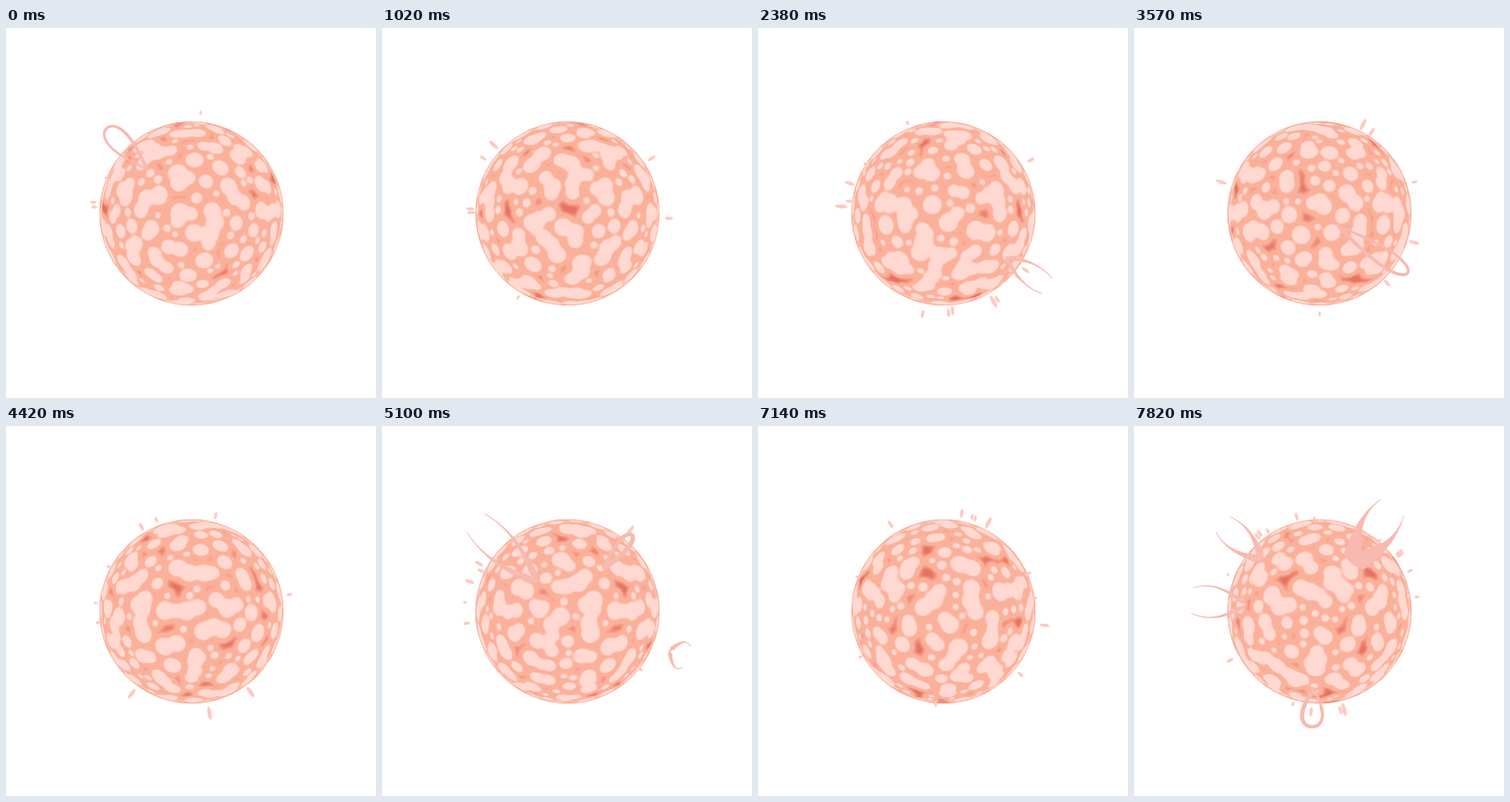
An HTML page with a canvas for the animation above (7990 ms loop, 400 px wide and 400 px high).

```html
<!DOCTYPE html>
<html lang="en">
<head>
<meta charset="utf-8">
<title>Star</title>
<style>
html, body { margin: 0; width: 100%; height: 100%; overflow: hidden; background: #fff; }
canvas { display: block; width: 100vw; height: 100vh; }
</style>
</head>
<body>
<canvas id="stage" width="400" height="400"></canvas>
<script>
const ctx = document.getElementById('stage').getContext('2d');
const STEP_MS = 170, LOOP_MS = 7990, STEPS = LOOP_MS / STEP_MS;
const C = 200.5, R = 99.5, RAD = Math.PI / 180, TURN = 12 * RAD;
const LIGHT = [255, 217, 209], MID = [251, 176, 153], DARK = [229, 116, 98];
const FLARE = '#f7b9b0', SPIKE = '#fdcac1';

let seed = 11;
const rand = (min = 0, max = 1) => {
  seed = (seed * 16807) % 2147483647;
  return min + (max - min) * seed / 2147483647;
};
const clamp = v => Math.max(0, Math.min(1, v));

// Surface: longitudes are unwound, so turning brings fresh blobs into view.
function randomSpot(r) {
  const y = rand(-1, 1);
  return { lon: 1.9 - rand() * (STEPS * TURN + 3.8), y, ring: Math.sqrt(1 - y * y), r };
}
function gap(a, b) {
  const d = a.lon - b.lon;
  if (Math.abs(d) > 1.6) return Infinity;
  const dot = a.y * b.y + a.ring * b.ring * Math.cos(d);
  return R * Math.sqrt(Math.max(0, 2 - 2 * dot)) - a.r - b.r;
}

const hotSpots = Array.from({ length: 45 }, () => randomSpot(0));
const blobs = [];
for (let i = 0; i < 18000; i++) {
  const big = i < 3000;
  const spot = randomSpot(big ? rand(6, 10) : rand(2.5, 5.5));
  const fits = b => {
    const g = gap(spot, b);
    return g > 4 || (big && g < -2 && g > -7);
  };
  if (hotSpots.every(h => gap(spot, h) > 8) && blobs.every(fits)) blobs.push(spot);
}

const SIZE = 202, LEFT = 100, SHARP = .55;
const image = ctx.createImageData(SIZE, SIZE);
const field = new Float32Array(SIZE * SIZE);
const offset = i => [i % SIZE + LEFT + .5 - C, Math.floor(i / SIZE) + LEFT + .5 - C];
const depth = field.map((_, i) => {
  const [x, y] = offset(i);
  return Math.sqrt(Math.max(0, 1 - (x * x + y * y) / (R * R)));
});

// Adds one blob to the field; nearby blobs melt together.
function splat(b, turn) {
  const lon = b.lon + turn;
  if (Math.abs(lon) > 1.9) return;
  const z = b.ring * Math.cos(lon), reach = b.r + 14;
  const cx = C + b.ring * Math.sin(lon) * R - LEFT, cy = C + b.y * R - LEFT;
  const x0 = Math.max(0, Math.floor(cx - reach)), x1 = Math.min(SIZE - 1, cx + reach);
  const y0 = Math.max(0, Math.floor(cy - reach)), y1 = Math.min(SIZE - 1, cy + reach);
  for (let py = y0; py <= y1; py++) {
    for (let px = x0; px <= x1; px++) {
      const i = py * SIZE + px;
      const d = Math.hypot(px + .5 - cx, py + .5 - cy, (depth[i] - z) * R);
      if (d < reach) field[i] += Math.exp(SHARP * (b.r - d));
    }
  }
}

function drawSphere(step) {
  field.fill(0);
  for (const b of blobs) splat(b, step * TURN);
  field.forEach((f, i) => {
    const cover = clamp(R + .5 - Math.hypot(...offset(i)));
    const away = -Math.log(f + 1e-9) / SHARP;
    const mid = clamp((away + .5) / 2), dark = clamp((away - 5) / 4);
    for (let k = 0; k < 3; k++) {
      const tone = LIGHT[k] + (MID[k] - LIGHT[k]) * mid + (DARK[k] - MID[k]) * dark;
      image.data[i * 4 + k] = 255 + (tone - 255) * cover;
    }
    image.data[i * 4 + 3] = 255;
  });
  ctx.putImageData(image, LEFT, LEFT);
  ring(R - 2, '#ffe0d888', 1.2);
  ring(R - .4, '#f4ac9a', .7);
}
function ring(r, color, width) {
  ctx.beginPath();
  ctx.arc(C, C, r, 0, 7);
  ctx.strokeStyle = color;
  ctx.lineWidth = width;
  ctx.stroke();
}

// Draws in a frame whose x axis points outwards from the centre.
function outward(angle, draw) {
  ctx.save();
  ctx.translate(C, C);
  ctx.rotate(angle);
  ctx.beginPath();
  draw();
  ctx.fill();
  ctx.restore();
}

const spikes = Array.from({ length: 100 }, () => ({
  angle: rand(0, 2 * Math.PI), birth: rand(-4, STEPS), length: rand(6, 15), start: rand(95, 101)
}));
function drawSpikes(step) {
  ctx.fillStyle = SPIKE;
  for (const s of spikes) {
    const age = (step - s.birth) / 5;
    if (age < 0 || age > 1) continue;
    const half = s.length / 2 * Math.sin(Math.PI * (.15 + .7 * age));
    outward(s.angle, () =>
      ctx.ellipse(s.start + age * 9 + half, 0, half, 1 + half / 6, 0, 0, 7));
  }
}

// Flares peak at a given step and reach from one radius to another.
const flare = (peak, angle, from, to, spread, width, paths) =>
  ({ peak, angle: angle * RAD, from, to, spread, width, paths });
const prong = side => ({
  rise: t => t,
  sway: t => side * Math.sin(2.2 * t),
  girth: t => (1 - t) ** 2 * Math.min(1, t * 8)
});
const FORK = [prong(-1), prong(1)];
const LOOP = [{
  rise: t => Math.sin(Math.PI * t),
  sway: t => Math.sin(2 * Math.PI * t),
  girth: t => 1 - t / 2
}];
const flares = [
  flare(0, 225, 68, 130, 11, 2.5, LOOP),
  flare(14, 35, 82, 137, 12, 5, FORK),
  flare(21, 34, 24, 115, 9, 3, LOOP),
  flare(30, 224, 45, 138, 17, 9, FORK),
  flare(30, 310, 60, 108, 6, 5, LOOP),
  flare(30, 21, 118, 138, 15, 5, FORK),
  flare(38, 48, 106, 135, 14, 7, FORK),
  flare(46, 222, 83, 140, 14, 9, FORK),
  flare(46, 185, 79, 138, 17, 5, FORK),
  flare(46, 305, 62, 137, 19, 26, FORK),
  flare(46, 94, 83, 125, 11, 4, LOOP)
];

function drawFlare(f, step) {
  const age = (step - f.peak) / 4;
  if (Math.abs(age) >= 1) return;
  // It grows from its base, then lets go and drifts away.
  const tail = Math.max(0, age), head = Math.min(1, 1 + age);
  ctx.fillStyle = FLARE;
  for (const { rise, sway, girth } of f.paths) {
    const at = t => [f.from + (f.to - f.from) * rise(t) + 10 * tail, f.spread * sway(t)];
    const left = [], right = [];
    for (let i = 0; i <= 40; i++) {
      const t = tail + (head - tail) * i / 40;
      const [x, y] = at(t), [ax, ay] = at(t - .01), [bx, by] = at(t + .01);
      const scale = (.45 + f.width / 2 * girth(t) * (1 - Math.abs(age))) / Math.hypot(bx - ax, by - ay);
      const nx = (ay - by) * scale, ny = (bx - ax) * scale;
      left.push([x + nx, y + ny]);
      right.unshift([x - nx, y - ny]);
    }
    outward(f.angle, () => [...left, ...right].forEach(p => ctx.lineTo(...p)));
  }
}

let shown = -1;
function tick(now) {
  const step = Math.floor(now % LOOP_MS / STEP_MS);
  if (step !== shown) {
    shown = step;
    ctx.fillStyle = '#fff';
    ctx.fillRect(0, 0, 400, 400);
    drawSphere(step);
    drawSpikes(step);
    for (const f of flares) drawFlare(f, step);
  }
  requestAnimationFrame(tick);
}
requestAnimationFrame(tick);
</script>
</body>
</html>
```
